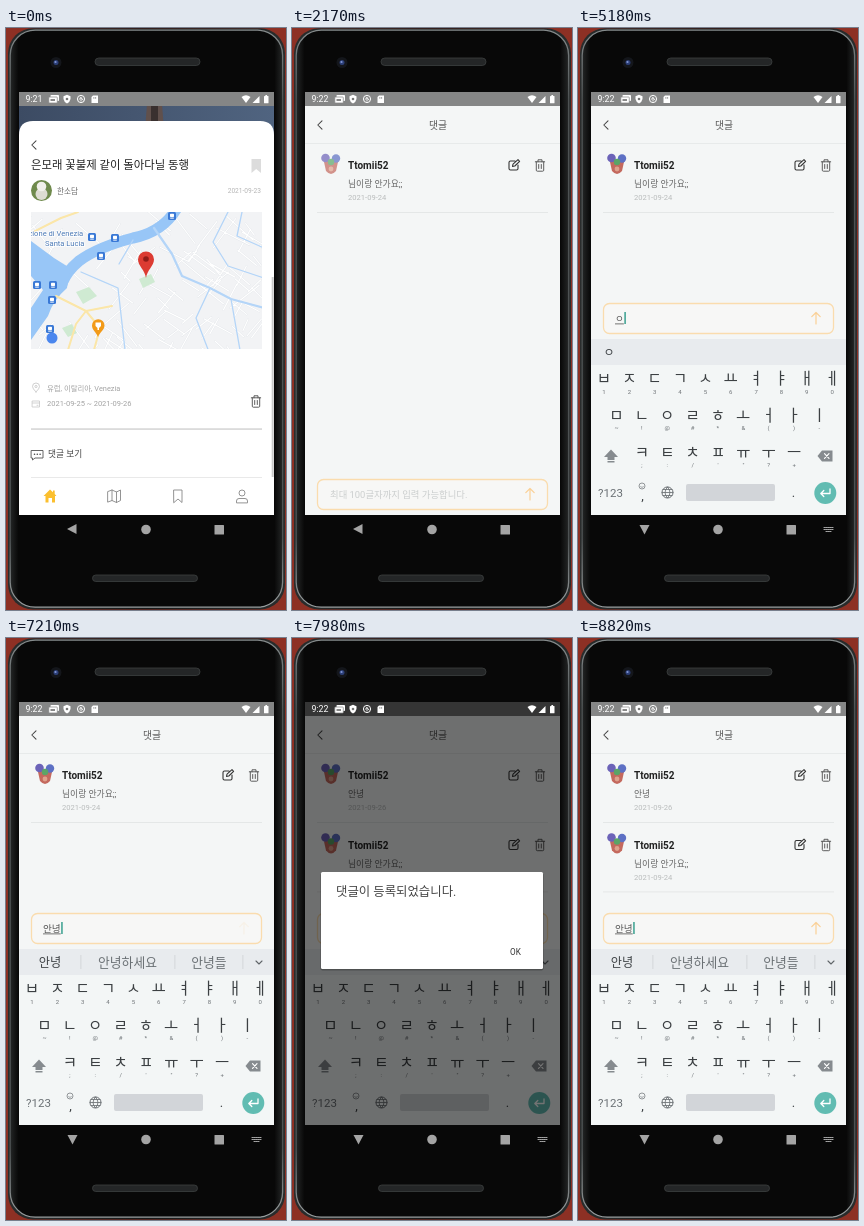
An HTML page for the animation above (9.17 s loop, 280 by 582 pixels).

```html
<!DOCTYPE html>
<html lang="ko">
<head>
<meta charset="utf-8">
<title>댓글 등록</title>
<style>
html, body { margin: 0; width: 100%; height: 100%; overflow: hidden; background: #8d3024; }
svg { display: block; width: 100%; height: 100%; }
text { font-family: Roboto, "Noto Sans CJK KR", "Noto Sans CJK", "Noto Sans", sans-serif; white-space: pre; }
</style>
</head>
<body>
<svg id="stage" viewBox="0 0 280 582" xmlns="http://www.w3.org/2000/svg"></svg>
<script>
const LOOP = 9170, STEP = 70;
const stage = document.getElementById('stage');

// Markup helpers
const text = (x, y, size, str, fill = '#333', more = '') =>
  `<text x="${x}" y="${y}" font-size="${size}" fill="${fill}" ${more}>${str}</text>`;
const mid = (x, y, size, str, fill, more = '') => text(x, y, size, str, fill, 'text-anchor="middle" ' + more);
const line = (d, color = '#333', w = 1, more = '') =>
  `<path d="${d}" fill="none" stroke="${color}" stroke-width="${w}" stroke-linecap="round" stroke-linejoin="round" ${more}/>`;
const fill = (d, color, more = '') => `<path d="${d}" fill="${color}" ${more}/>`;
const box = (x, y, w, h, color, r = 0, more = '') =>
  `<rect x="${x}" y="${y}" width="${w}" height="${h}" rx="${r}" fill="${color}" ${more}/>`;
const dot = (x, y, r, color, more = '') => `<circle cx="${x}" cy="${y}" r="${r}" fill="${color}" ${more}/>`;
const group = (id, body, more = '') => `<g id="${id}" ${more}>${body}</g>`;
const at = (x, y, body) => `<g transform="translate(${x} ${y})">${body}</g>`;

const chevron = (x, y) => line(`M${x + 2} ${y - 4.2}l-4.2 4.2 4.2 4.2`, '#444', 1.05);
const trash = (x, y, c = '#555') => at(x, y,
  line('M-4.700 -3.700H4.700M-2 -3.700V-5.700H2V-3.700M-3.700 -3.700V4.700Q-3.700 5.700 -2.700 5.700H2.700Q3.700 5.700 3.700 4.700V-3.700M-1.300 -1V3M1.300 -1V3', c, .95));
const edit = (x, y) => at(x, y,
  line('M1 -4H-3.5Q-5 -4 -5 -2.5V3.5Q-5 5 -3.5 5H2.5Q4 5 4 3.5V0M-1.5 1.5L-1 -.8 4 -5.3 5.6 -3.7 .8 1Z', '#333', 1.1));

function phone() {
  const slot = (x, y, w, h) => box(x, y, w, h, '#242627', h / 2, 'stroke="#3d4041" stroke-width=".8"');
  return box(0, 0, 280, 582, '#8d3024') +
    box(2, .3, 277, 581.200, 'url(#edge)', 25) +
    box(4.200, 2.200, 272.400, 577, 'url(#glass)', 25, 'stroke="url(#rim)" stroke-width="1.300"') +
    slot(89, 30, 105, 7.5) + slot(86.5, 547, 105, 6.5) +
    dot(50, 34.5, 5.5, '#14161b') + dot(50, 34.5, 2.5, '#2c3f78') + dot(49.5, 34, 1.1, '#7f95d4');
}

function map() {
  let seed = 11;
  const rnd = () => (seed = seed * 16807 % 2147483647) / 2147483647;
  let lanes = '';
  for (let i = 0; i < 110; i++) {
    const x = 25 + rnd() * 232, y = 184 + rnd() * 138, a = (i % 2 ? .45 : 2) + rnd() * .5, len = 12 + rnd() * 28;
    lanes += `M${x.toFixed(1)} ${y.toFixed(1)}l${(Math.cos(a) * len).toFixed(1)} ${(Math.sin(a) * len).toFixed(1)}`;
  }
  const water = '#98c6f7', brook = '#b4d5f8';
  const stops = [[86, 209], [109, 210], [95, 228], [166, 188], [31, 257], [47, 257], [46, 272], [44, 301]]
    .map(([x, y]) => box(x - 4, y - 4, 8, 8, '#3978d6', 1.5) + box(x - 2, y - 2.3, 4, 3.2, '#fff', .6) +
      box(x - 1.8, y + 1.6, 3.6, 1, '#fff')).join('');
  return `<g clip-path="url(#mapClip)">` + box(25, 184, 231, 137, '#f2f3f5') +
    line(lanes, '#e2e5e9', 1.9) + line(lanes, '#fff', 1.2) +
    fill('M70 264l13-5 8 9-14 8zM133 251l12-5 4 8-12 6zM56 300l10-4 5 9-9 4z', '#cfead2') +
    line('M171 180Q157 204 127 210 92 219 73 233 60 244 56 256', water, 11) +
    fill('M25 213L48 230 64 240 61 260Q47 272 42 288L25 312V280L37 262 25 248Z', water) +
    line('M148 200L166 226 176 248 204 260 225 271 258 280', brook, 2.200) +
    line('M222 184L207 214 222 238 258 250M204 260L190 290 203 324M75 244L112 260 119 322M127 212L113 236M236 184L231 208 258 220M225 271L234 322', brook, 1.300) +
    line('M50 268L80 283 94 300 88 322M80 283L106 278M25 205L55 190 72 184M62 322L70 296 80 283', '#fbe6a8', 2) +
    stops + text(22.5, 208, 7.6, 'zione di Venezia', '#4a78b5', 'stroke="#fff" stroke-width="1.6" paint-order="stroke"') +
    text(39, 217.5, 7.6, 'Santa Lucia', '#4a78b5', 'stroke="#fff" stroke-width="1.6" paint-order="stroke"') +
    fill('M92 309C90 304 86 302 86 297.500A6.200 6.200 0 0 1 98.500 297.500C98.500 302 94 304 92 309Z', '#f29a19') +
    fill('M89.500 294.500H95V298L93 300V302H91.500V300L89.500 298Z', '#fff') +
    fill('M140 250C139 242 132 238 132 231.500A8 8 0 0 1 148 231.500C148 238 141 242 140 250Z', '#dc3b32') +
    dot(140, 231, 2.8, '#8f1c18') + dot(46, 310, 5.5, '#4a86ee') + '</g>';
}

function detailPage() {
  const photo = box(13, 64, 255, 60, 'url(#sky)') +
    fill('M141 76h15l3 40h-21z', '#60504c') + fill('M145 78h7v38h-7z', '#39302f');
  const tabs = box(13, 449, 255, 38, '#fff') + box(25, 449, 231, .8, '#e4e4e4') +
    fill('M37.500 468L44 461.500 47 464.200V462.500H48.700V466L50.500 468H49V474.500H46V470H42.500V474.500H39.500V468Z', '#fbbf2e') +
    line('M102 463.500L106 462 110.500 464 114.500 462V472.500L110.500 474.500 106 472.500 102 474ZM106 462V472.500M110.500 464V474.500', '#888', .9) +
    line('M168 462H176V474.500L172 471 168 474.500Z', '#888', .9) +
    line('M230.500 474.500V473Q230.500 470.500 233 470.500H239Q241.500 470.500 241.500 473V474.500Z', '#888', .9) +
    dot(236, 465, 3, 'none', 'stroke="#888" stroke-width=".9"');
  return photo + fill('M13 487V107Q13 93 27 93H254Q268 93 268 107V487Z', '#fff') +
    chevron(28, 117) + text(25, 141, 11.4, '은모래 꽃불제 같이 돌아다닐 동행', '#222', 'font-weight="500"') +
    fill('M245.500 131H255V145L250.200 141 245.500 145Z', '#dcdcdc') +
    dot(35.500, 162.500, 10.500, '#6f8a4c') +
    `<ellipse cx="35.500" cy="166" rx="6" ry="6" fill="#dddcd2"/>` + dot(35.500, 158.500, 4.800, '#f1f0ea') +
    text(51, 165.500, 7.6, '한소담', '#666') + text(255, 165, 6.6, '2021-09-23', '#b5b5b5', 'text-anchor="end"') +
    map() +
    line('M30 364Q26.500 360.500 26.500 358.500A3.500 3.500 0 0 1 33.500 358.500Q33.500 360.500 30 364Z', '#c4c4c4', .8) + dot(30, 358.500, 1.1, 'none', 'stroke="#c4c4c4" stroke-width=".8"') +
    line('M26.500 373H33.500V379H26.500ZM26.500 375H33.500M31 377.300H32', '#c8c8c8', .8) +
    text(41, 362.500, 7.4, '유럽, 이탈리아, Venezia', '#a3a3a3') +
    text(41, 378, 7.5, '2021-09-25 ~ 2021-09-26', '#a3a3a3') + trash(250, 373.500) +
    box(25, 400.500, 231, 1.1, '#c4c4c4') +
    group('open', line('M25.500 422.500H37V430H29L26.500 432V430H25.500Z', '#555', .9) +
      dot(28.500, 426.300, .8, '#444') + dot(31.300, 426.300, .8, '#444') + dot(34.100, 426.300, .8, '#444') +
      text(42, 429.300, 8.7, '댓글 보기', '#444')) +
    group('bar', box(265.700, 249, 2, 210, '#cacaca')) + group('tabs', tabs);
}

function comment(id, words, date) {
  const pic = fill('M32 134Q39 130 46 134L44 143Q39 149 34 143Z', '#c4695e') +
    dot(33.500, 130, 4.3, '#6c63b8') + dot(44, 130.500, 4.2, '#5d70c4') + dot(39, 134, 3.2, '#5aa567') + dot(39, 141, 2.4, '#dfa18c');
  return group(id, group(id + 'Pic', pic) + text(56, 141, 10, 'Ttomii52', '#222', 'font-weight="700"') +
    text(56, 159.300, 8.800, words, '#666') + text(56, 172, 7.6, date, '#b9bcbc') +
    edit(222, 137) + trash(248, 137.500, '#555') + box(25, 184, 231, .9, '#e3e6e6'));
}

function commentPage() {
  return box(13, 64, 255, 423, '#f4f6f6') + chevron(28, 97) + mid(146, 100.500, 9.8, '댓글', '#555') +
    box(13, 115, 255, .9, '#e6e9e9') +
    comment('fresh', '안녕', '2021-09-26') + comment('first', '님이랑 안가요;;', '2021-09-24') +
    group('gap', box(13, 311, 255, 176, '#fff')) +
    group('input',
      group('frame', box(25.500, 275.500, 230, 30, '#f7f7f6', 6, 'stroke="#fadcae" stroke-width="1.3"') +
        group('send', line('M238 296V284.500M233.800 288.700L238 284.500 242.200 288.700', '#fad096', 1.2))) +
      group('hint', text(38, 293.500, 9.4, '최대 100글자까지 입력 가능합니다.', '#cbcece')) +
      text(37, 293.500, 9.6, '', '#555', 'id="typed"') + box(37, 295.500, 9, .8, '#555', 0, 'id="under"') +
      box(37.500, 284, 1.5, 12, '#3aa08f', 0, 'id="caret"'));
}

function keyboard() {
  const row = (x, y, keys, subs) => [...keys].map((k, i) => {
    const cx = x + 25.35 * i;
    return mid(cx, y + 6, 15.5, k, '#3c4043') + mid(cx, y + 15.500, 6, subs[i].replace('&', '&amp;'), '#6d7276');
  }).join('');
  const tools = mid(39, 330.500, 15, 'ㅎ', '#666b6f') + line('M35 333H43', '#666b6f', .8) + mid(92, 329.500, 12.5, 'En', '#6f7478') +
    box(246.700, 319.500, 3.600, 7, '#8d9296', 1.8) + line('M244.800 325Q245 329 248.500 329 252 329 252.200 325M248.500 329V331', '#8d9296', .9);
  const strip = box(13, 311, 255, 26, '#e8ebee') + mid(31, 329, 12, '', '#3c4043', 'id="guess"') +
    group('words', mid(44, 329, 12.2, '안녕', '#3c4043', 'font-weight="500"') + mid(121.500, 329, 12.8, '안녕하세요', '#6a7074') +
      mid(203, 329, 12.8, '안녕들', '#6a7074') + box(74.500, 317, .8, 14, '#cdd1d4') + box(168.500, 317, .8, 14, '#cdd1d4') +
      box(236.500, 317, .8, 14, '#cdd1d4') + line('M250 323L253 326 256 323', '#5f6468', 1.1));
  return box(13, 311, 255, 176, '#f3f6f6') + group('tools', tools) + group('strip', strip) +
    row(26, 350, 'ㅂㅈㄷㄱㅅㅛㅕㅑㅐㅔ', '1234567890') +
    row(38.500, 386.500, 'ㅁㄴㅇㄹㅎㅗㅓㅏㅣ', '~!@#*&()-') +
    row(64, 423.500, 'ㅋㅌㅊㅍㅠㅜㅡ', ';:/\'"?+') +
    fill('M33 421.500L40 429H36.500V432H29.500V429H26ZM29.500 433H36.500V434.500H29.500Z', '#868b8f') +
    fill('M239.500 428L244 422.500H254.500V433.500H244Z', '#868b8f') + line('M246.500 425.700L251 430.300M251 425.700L246.500 430.300', '#fff', 1.2) +
    mid(32.500, 469, 11.5, '?123', '#6a7074') + mid(64.500, 471.500, 13, ',', '#3c4043') +
    dot(64, 458, 3, 'none', 'stroke="#7a7f83" stroke-width=".8"') + line('M62.600 458.800Q64 460.200 65.400 458.800', '#7a7f83', .7) +
    dot(89.500, 464.500, 5.500, 'none', 'stroke="#666b6f"') +
    line('M84 464.500H95M85 461.500H94M85 467.500H94M89.500 459Q84.500 464.500 89.500 470 94.500 464.500 89.500 459', '#666b6f', .8) +
    box(108, 456, 89, 17, '#d2d5d9', 2) + mid(215.500, 469, 13, '.', '#3c4043') + dot(247.300, 465, 11, '#61bcb2') +
    line('M252 461V465.500H243M245.800 462.500L242.800 465.500 245.800 468.500', '#fff', 1.3);
}

function statusIcons() {
  const w = '#fff';
  return text(19.500, 74.300, 8.800, '9:21', w, 'id="clock"') +
    box(44.500, 67, 8.500, 6, w, .8) + box(42.800, 69, 8.500, 6, w, .8, 'stroke="#858686" stroke-width=".7"') + box(44.500, 71, 4.500, 2, '#888') +
    fill('M61 66.800L64.500 68.200V71Q64 74 61 75.500 58 74 57.500 71V68.200Z', w) + dot(61, 71, 1.3, '#777') +
    dot(75, 71, 3.600, 'none', 'stroke="#fff"') + line('M73 71.500L75 69.500 77 72M75 69.500V73', w, .9) +
    fill('M87 67.500H92V75H85.500V69Z', w) + box(87.500, 69, .8, 1.8, '#888') + box(89.300, 69, .8, 1.8, '#888') +
    fill('M235.500 69Q240 65.500 244.500 69L240 75Z', w) + fill('M246.500 75L253.500 68V75Z', w) +
    box(258, 68, 4.500, 7.300, w, .6) + box(259.400, 67, 1.700, 1.500, w);
}

const navIcons = () => group('back', fill('M61 501L70.500 496V506Z', '#a4a4a4')) + dot(140, 501.500, 4.800, '#a4a4a4') +
  box(208.500, 497, 9.500, 9.500, '#a4a4a4', .5) +
  group('kbdIcon', line('M246 499.500H255M246 501.500H255M248 503.500H253', '#a4a4a4', 1.200, 'stroke-dasharray="1.200 .8" stroke-linecap="butt"'));

const dialog = () => box(13, 64, 255, 14, '#000', 0, 'opacity=".6"') + box(13, 78, 255, 409, '#000', 0, 'opacity=".55"') +
  box(28.500, 235, 223, 97.500, '#000', 2, 'opacity=".25"') + box(29, 234, 222, 97, '#fff', 1.5) +
  text(44, 257.500, 12.4, '댓글이 등록되었습니다.', '#444') + mid(223.500, 317, 8.2, 'OK', '#333');

const gradient = (id, more, stops) => `<linearGradient id="${id}" ${more}>` +
  stops.map(([at, color]) => `<stop offset="${at}" stop-color="${color}"/>`).join('') + '</linearGradient>';
const down = 'x1="0" y1="0" x2="0" y2="1"';

stage.innerHTML = `<defs><clipPath id="screen">${box(13, 64, 255, 450, '#000')}</clipPath>
  <clipPath id="view">${box(13, 64, 255, 423, '#000')}</clipPath>
  <clipPath id="mapClip">${box(25, 184, 231, 137, '#000')}</clipPath>` +
  gradient('edge', '', [[0, '#2a2d2d'], [.5, '#161818'], [1, '#2a2d2d']]) +
  gradient('glass', '', [[0, '#242626'], [.03, '#080808'], [.97, '#080808'], [1, '#242626']]) +
  gradient('rim', down, [[0, '#858b8c'], [.12, '#4d5253'], [.88, '#4d5253'], [1, '#9a9fa0']]) +
  gradient('sky', '', [[0, '#3c4b63'], [.45, '#455670'], [1, '#506480']]) + '</defs>' + phone() +
  `<g clip-path="url(#view)">${group('detail', detailPage())}${group('talk', commentPage())}</g>` +
  box(13, 64, 255, 14, '#858686') +
  `<g clip-path="url(#screen)">${group('keys', keyboard())}</g>` +
  group('alert', dialog()) + statusIcons() + navIcons();

const el = {};
stage.querySelectorAll('[id]').forEach(e => el[e.id] = e);

const set = (id, attrs) => { for (const k in attrs) el[id].setAttribute(k, attrs[k]); };
const show = (id, amount) => set(id, { opacity: +amount, visibility: amount > 0 ? 'inherit' : 'hidden' });
const ramp = (t, a, b) => Math.min(1, Math.max(0, (t - a) / (b - a)));
const zoom = s => `translate(140 282) scale(${s}) translate(-140 -282)`;
const between = (t, a, b) => t >= a && t < b;

const typing = [[0, ''], [5040, 'ㅇ'], [5320, '아'], [5460, '안'], [5600, '안ㄴ'], [5740, '안녀'], [5950, '안녕']];
const caretOff = [[3920, 4410], [4900, 5040], [6510, 7070], [7560, 8050], [8540, 8750]];
// time, drop, opacity
const rise = [[3220, 66, 0], [3290, 58, .12], [3360, 49, .26], [3430, 38, .44], [3500, 27, .62], [3570, 14, .8], [3640, 5, .93], [3710, 0, 1]];

function render(t) {
  const p = ramp(t, 840, 1260), q = ramp(p, .35, .8);
  el.clock.textContent = t < 490 ? '9:21' : '9:22';
  show('bar', 1 - ramp(t, 0, 210));
  show('open', 1 - .6 * ramp(t, 420, 630));
  show('tabs', t < 910);
  show('detail', p < 1);
  set('detail', { transform: zoom(1 + .069 * p) });
  show('talk', q);
  set('talk', { transform: zoom(.85 + .15 * ramp(p, .2, 1)) });

  const posted = t >= 7490;
  show('first', t >= 1400);
  show('firstPic', ramp(t, 1680, 2380));
  show('fresh', posted ? ramp(t, 7420, 7630) : 0);
  set('first', { transform: `translate(0 ${posted ? 69.5 : 0})` });

  const up = t >= 3290;
  show('gap', up);
  set('input', { transform: `translate(0 ${up ? 0 : 176})` });
  show('frame', up ? .1 + .9 * ramp(t, 3500, 3710) : 1);
  show('send', between(t, 7210, 7490) ? .15 : t < 7490 ? 1 : ramp(t, 7420, 7630));

  const word = typing.filter(s => t >= s[0]).pop()[1];
  const wide = word.length * 8.85;
  el.typed.textContent = word;
  show('hint', !word);
  show('under', word ? 1 : 0);
  set('under', { width: wide });
  set('caret', { x: 37.5 + wide });
  show('caret', t >= 3430 && !caretOff.some(([a, b]) => between(t, a, b)));

  const k = rise.filter(s => t >= s[0]).pop() || rise[0];
  show('keys', k[2]);
  set('keys', { transform: `translate(0 ${k[1]})` });
  show('tools', !word);
  show('strip', word ? 1 : 0);
  const full = word === '안녕';
  el.guess.textContent = full ? '' : word;
  show('words', full);
  set('back', { transform: `rotate(${-90 * ramp(t, 3290, 3640)} 66.5 501)` });
  show('kbdIcon', ramp(t, 3360, 3710));

  show('alert', t < 8680 ? ramp(t, 7700, 7980) : 1 - ramp(t, 8610, 8820));
}

const start = performance.now();
function tick() {
  const t = (performance.now() - start) % LOOP;
  render(Math.floor(t / STEP) * STEP);
  requestAnimationFrame(tick);
}
tick();
</script>
</body>
</html>
```
